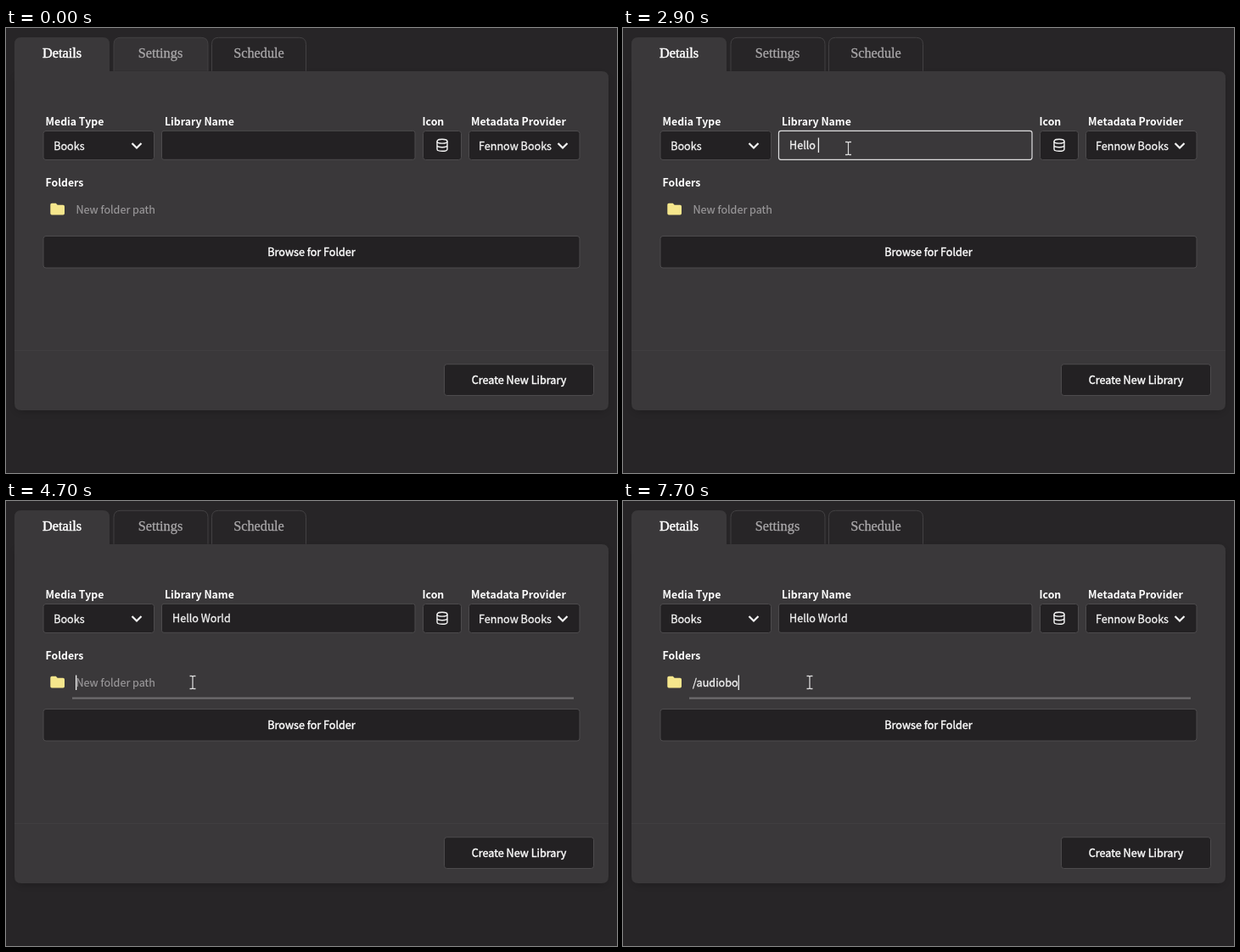
Write an HTML page that moves like this. It is 720 by 525 pixels and loops after 8 s.

```html
<!DOCTYPE html>
<html lang="en">
<head>
<meta charset="utf-8">
<title>New library form</title>
<style>
  html, body { margin: 0; width: 100%; height: 100%; overflow: hidden; background: #272527; }
  svg { display: block; width: 720px; height: 525px; }
  text { font: 12.6px "Noto Sans CJK JP", "Noto Sans CJK SC", "Noto Sans CJK", "Noto Sans", sans-serif;
         fill: #f4f4f4; stroke: #f4f4f4; stroke-width: .3; white-space: pre; }
  .label { font-size: 12.3px; font-weight: 700; fill: #fff; stroke: none; }
  .button { fill: #fff; stroke: #fff; stroke-width: .4; text-anchor: middle; }
  .hint { fill: #9c9a9c; stroke: #9c9a9c; stroke-width: .15; }
  .tab { font: 16.3px "Liberation Serif", "Noto Serif", serif; fill: #aaa8aa; stroke: #aaa8aa; text-anchor: middle; }
  .tab.active { fill: #fff; stroke: #fff; stroke-width: .5; }
  .box { fill: #232123; stroke: #4d4b4d; }
  .box.focus { fill: #3a383a; stroke: #dededf; stroke-width: 1.2; }
  .side { fill: #272527; stroke: #434143; }
  .side.hover { fill: #353335; }
  .icon { fill: none; stroke: #f4f4f4; stroke-width: 1.4; }
  .chevron { fill: none; stroke: #f4f4f4; stroke-width: 2.2; }
</style>
</head>
<body>
<svg viewBox="0 0 720 525">
  <defs>
    <filter id="soft" x="-5%" y="-5%" width="110%" height="115%"><feGaussianBlur stdDeviation="5"/></filter>
    <path id="tab" d="M.5 40V8.500q0-8 8-8h95q8 0 8 8V40"/>
    <path id="beam" d="M-3.500-7.500h2.500q1 0 1 1q0-1 1-1h2.500M0-6.500V6.500M-3.500 7.500h2.500q1 0 1-1q0 1 1 1h2.500"/>
  </defs>

  <rect x="12" y="56" width="696" height="396" rx="8" fill="#000" opacity=".22" filter="url(#soft)"/>
  <use id="settings" class="side" href="#tab" x="126.500" y="10.800"/>
  <use class="side" href="#tab" x="242" y="10.800"/>
  <path fill="#3a383a" d="M10 60V19q0-8 8-8h96q8 0 8 8v32h580q8 0 8 8v384q0 8-8 8H18q-8 0-8-8z"/>
  <path stroke="#403e40" d="M10 380.500h700"/>
  <text class="tab active" x="66" y="35">Details</text>
  <text class="tab" x="182" y="35">Settings</text>
  <text class="tab" x="298" y="35">Schedule</text>

  <text class="label" x="46.500" y="115">Media Type</text>
  <text class="label" x="187" y="115">Library Name</text>
  <text class="label" x="490.500" y="115">Icon</text>
  <text class="label" x="548" y="115">Metadata Provider</text>
  <text class="label" x="46.500" y="187">Folders</text>

  <rect class="box" x="44" y="121.500" width="130.500" height="34" rx="3"/>
  <rect id="nameBox" class="box" x="183.500" y="121.300" width="298.500" height="34" rx="2.500"/>
  <rect class="box" x="491.500" y="121.500" width="45" height="34" rx="3"/>
  <rect class="box" x="545.500" y="121.500" width="130.500" height="34" rx="3"/>
  <rect class="box" x="44" y="245.500" width="632" height="37.500" rx="3"/>
  <rect class="box" x="516.500" y="396.700" width="176" height="36.800" rx="3"/>

  <text x="56.200" y="144">Books</text>
  <text x="557" y="144">Fennow Books</text>
  <path class="chevron" d="M148.500 136l5.500 5.500l5.500-5.500M650.500 136l5.500 5.500l5.500-5.500"/>
  <g class="icon">
    <ellipse cx="514" cy="133.700" rx="6" ry="2.400"/>
    <path d="M508 133.700v9.200c0 3.200 12 3.200 12 0v-9.200M508 138.300c0 3.200 12 3.200 12 0"/>
  </g>
  <path fill="#f5e68c" d="M54 206.800h4.800l1.900 2h6.600q1.700 0 1.700 1.700v8.300q0 1.700-1.700 1.700H54q-1.700 0-1.700-1.700v-10.300q0-1.700 1.700-1.700z"/>
  <text class="button" x="360" y="269">Browse for Folder</text>
  <text class="button" x="604.500" y="420">Create New Library</text>

  <path id="underline" stroke="#6d6b6d" stroke-width="2.200" d="M78 232.700H669"/>
  <text id="hint" class="hint" x="82.400" y="219">New folder path</text>
  <text id="name" x="196" y="143"></text>
  <text id="path" x="82" y="219"></text>
  <rect id="caret" width="1.300" height="17.500" fill="#f0f0f0"/>
  <g id="mouse" fill="none">
    <use href="#beam" stroke="#1d1c1e" stroke-width="2.600" opacity=".5"/>
    <use href="#beam" stroke="#dcdcdc" stroke-width="1.300"/>
  </g>
</svg>
<script>
const LOOP = 8000;
const $ = id => document.getElementById(id);
const show = (id, on) => $(id).setAttribute('visibility', on ? 'visible' : 'hidden');

// Each field gets focus at a time, then one more letter at each key time.
const nameField = { id: 'name', text: 'Hello World', focus: 800, x: 196, top: 129.5,
  keys: [1900, 2100, 2300, 2500, 2700, 2900, 3100, 3300, 3400, 3600, 3700] };
const pathField = { id: 'path', text: '/audiobo', focus: 4700, x: 82, top: 205.5,
  keys: [5800, 6100, 6300, 6700, 6900, 7200, 7600, 7700] };

function type(field, t) {
  const pressed = field.keys.filter(k => k <= t);
  $(field.id).textContent = field.text.slice(0, pressed.length);
  return t - (pressed.at(-1) ?? field.focus);
}

function drawCaret(field, idle) {
  const caret = $('caret');
  const again = idle >= 1000 && field === nameField ? 0.6 : 0;
  caret.setAttribute('x', field.x + $(field.id).getComputedTextLength());
  caret.setAttribute('y', field.top);
  caret.setAttribute('opacity', idle < 500 ? 1 : again);
}

function draw(time) {
  const t = Math.floor(time % LOOP / 100) * 100;
  const inPath = t >= pathField.focus;
  const inName = t >= nameField.focus && !inPath;
  const nameIdle = type(nameField, t), pathIdle = type(pathField, t);

  $('settings').classList.toggle('hover', t < 100);
  $('nameBox').classList.toggle('focus', inName);
  show('underline', inPath);
  show('hint', t < pathField.keys[0]);
  show('caret', inName || inPath);
  drawCaret(inPath ? pathField : nameField, inPath ? pathIdle : nameIdle);

  const p = Math.min(1, Math.max(0, (t - 4100) / 400));
  const move = p * p * (3 - 2 * p);
  show('mouse', t >= 700);
  $('mouse').setAttribute('transform', `translate(${265.5 - 45.5 * move} ${142 + 72 * move})`);
}

const start = performance.now();
function tick() {
  draw(performance.now() - start);
  requestAnimationFrame(tick);
}
tick();
</script>
</body>
</html>
```
